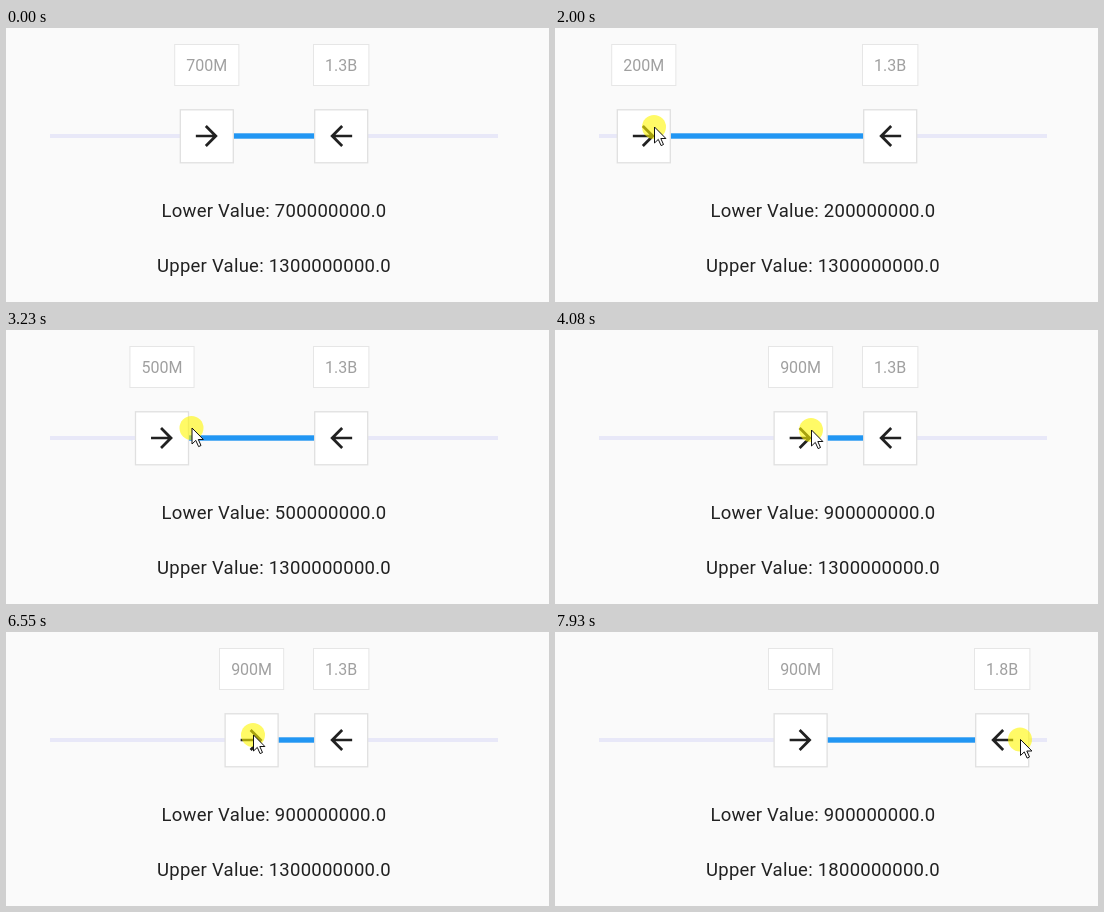
Recreate the animation shown at these times as an HTML page with a canvas. Size 543 px wide and 274 px high, loop 8000 ms.

```html
<!DOCTYPE html>
<html lang="en">
<head>
<meta charset="utf-8">
<title>Range slider</title>
<style>
  html, body { margin: 0; width: 100%; height: 100%; overflow: hidden; background: #fafafa; }
  canvas { display: block; width: 543px; height: 274px; }
</style>
</head>
<body>
<canvas id="stage"></canvas>
<script>
const W = 543, H = 274, LOOP = 8000, FPS = 13;
const TRACK = { left: 44, right: 492, y: 108 };
const STEP = (TRACK.right - TRACK.left) / 20; // one step is 100 million

// Keys are [tick, value...]; ticks run at FPS.
const LOWER = [[0, 7], [12, 7], [22, 3], [26, 2], [30, 0], [33, 0], [42, 5], [44, 6], [53, 9],
  [55, 9], [60, 10], [64, 10], [69, 13], [75, 13], [85, 9]];
const UPPER = [[0, 13], [93, 13], [97, 15], [103, 18]];
const POINTER = [[1, 439, 272], [3, 395, 222], [7, 240, 140], [9, 199, 117], [11, 198, 114],
  [13, 208, 102], [22, 122, 99], [26, 99.5, 99], [30, 54, 100], [33, 53, 100], [42, 186, 98],
  [44, 192, 98], [53, 256.5, 100], [55, 258, 100], [60, 280, 101], [64, 280, 101],
  [70, 348.5, 102], [73, 367, 102], [75, 356, 102], [85, 247.5, 103], [86, 247.5, 103],
  [93, 347, 104], [97, 394, 106], [103, 465.5, 107.5]];

const ARROW = new Path2D('M12 4l-1.41 1.41L16.17 11H4v2h12.17l-5.58 5.59L12 20l8-8z');
const CURSOR = new Path2D('M0 0V16L3.8 12.4L6.6 18.6L9 17.5L6.3 11.5H11.4Z');

const canvas = document.getElementById('stage');
const ctx = canvas.getContext('2d');
const ratio = window.devicePixelRatio || 1;
canvas.width = W * ratio;
canvas.height = H * ratio;

function sample(keys, tick) {
  const next = keys.findIndex(key => key[0] > tick);
  if (next < 0) return keys[keys.length - 1].slice(1);
  if (next === 0) return keys[0].slice(1);
  const a = keys[next - 1], b = keys[next];
  const p = (tick - a[0]) / (b[0] - a[0]);
  return a.slice(1).map((v, i) => v + (b[i + 1] - v) * p);
}

const toX = value => TRACK.left + value * STEP;

function shortLabel(value) {
  if (value >= 10) return value / 10 + 'B';
  return value ? value * 100 + 'M' : '0';
}

function bar(x1, x2, height, color) {
  ctx.fillStyle = color;
  ctx.fillRect(x1, TRACK.y - height / 2, x2 - x1, height);
}

function box(x, y, w, h, stroke, line) {
  ctx.fillStyle = '#fff';
  ctx.fillRect(x, y, w, h);
  ctx.strokeStyle = stroke;
  ctx.lineWidth = line;
  ctx.strokeRect(x, y, w, h);
}

function text(str, x, y, size, color, spacing) {
  ctx.font = size + 'px Roboto, sans-serif';
  ctx.letterSpacing = spacing + 'px';
  ctx.fillStyle = color;
  ctx.fillText(str, x, y);
}

function tooltip(value) {
  const label = shortLabel(value), x = toX(value);
  ctx.font = '16px Roboto, sans-serif';
  ctx.letterSpacing = '0px';
  const w = ctx.measureText(label).width + 23.2;
  box(x - w / 2, 16.5, w, 41, '#e6e6e6', 1);
  text(label, x, 42.6, 16, '#a0a0a0', 0);
}

function thumb(value, direction) {
  const x = toX(value);
  box(x - 26.5, TRACK.y - 26.2, 53, 53, '#e0e0e0', 1.3);
  ctx.save();
  ctx.translate(x, TRACK.y);
  ctx.scale(1.37 * direction, 1.37);
  ctx.translate(-12, -12);
  ctx.fillStyle = '#212121';
  ctx.fill(ARROW);
  ctx.restore();
}

function pointer(x, y) {
  ctx.fillStyle = 'rgba(255, 246, 0, 0.6)';
  ctx.beginPath();
  ctx.arc(x - 0.5, y, 12, 0, Math.PI * 2);
  ctx.fill();
  ctx.save();
  ctx.translate(x, y);
  ctx.fillStyle = '#fff';
  ctx.strokeStyle = '#111';
  ctx.lineWidth = 1;
  ctx.fill(CURSOR);
  ctx.stroke(CURSOR);
  ctx.restore();
}

function draw(time) {
  const tick = Math.floor((time % LOOP + 8) * FPS / 1000) % (LOOP * FPS / 1000);
  const lower = Math.round(sample(LOWER, tick)[0]);
  const upper = Math.round(sample(UPPER, tick)[0]);

  ctx.setTransform(ratio, 0, 0, ratio, 0, 0);
  ctx.textAlign = 'center';
  ctx.fillStyle = '#fafafa';
  ctx.fillRect(0, 0, W, H);

  bar(TRACK.left, TRACK.right, 4, '#e8e8f8');
  bar(toX(lower), toX(upper), 5.4, '#2196f3');
  thumb(lower, 1);
  thumb(upper, -1);
  tooltip(lower);
  tooltip(upper);
  text('Lower Value: ' + (lower * 1e8).toFixed(1), 268, 188.5, 18.5, '#212121', 0.25);
  text('Upper Value: ' + (upper * 1e8).toFixed(1), 268, 243.5, 18.5, '#212121', 0.25);
  if (tick > 0) pointer(...sample(POINTER, tick));
}

let start;
function frame(now) {
  start ??= now;
  draw(now - start);
  requestAnimationFrame(frame);
}
draw(0);
requestAnimationFrame(frame);
</script>
</body>
</html>
```
